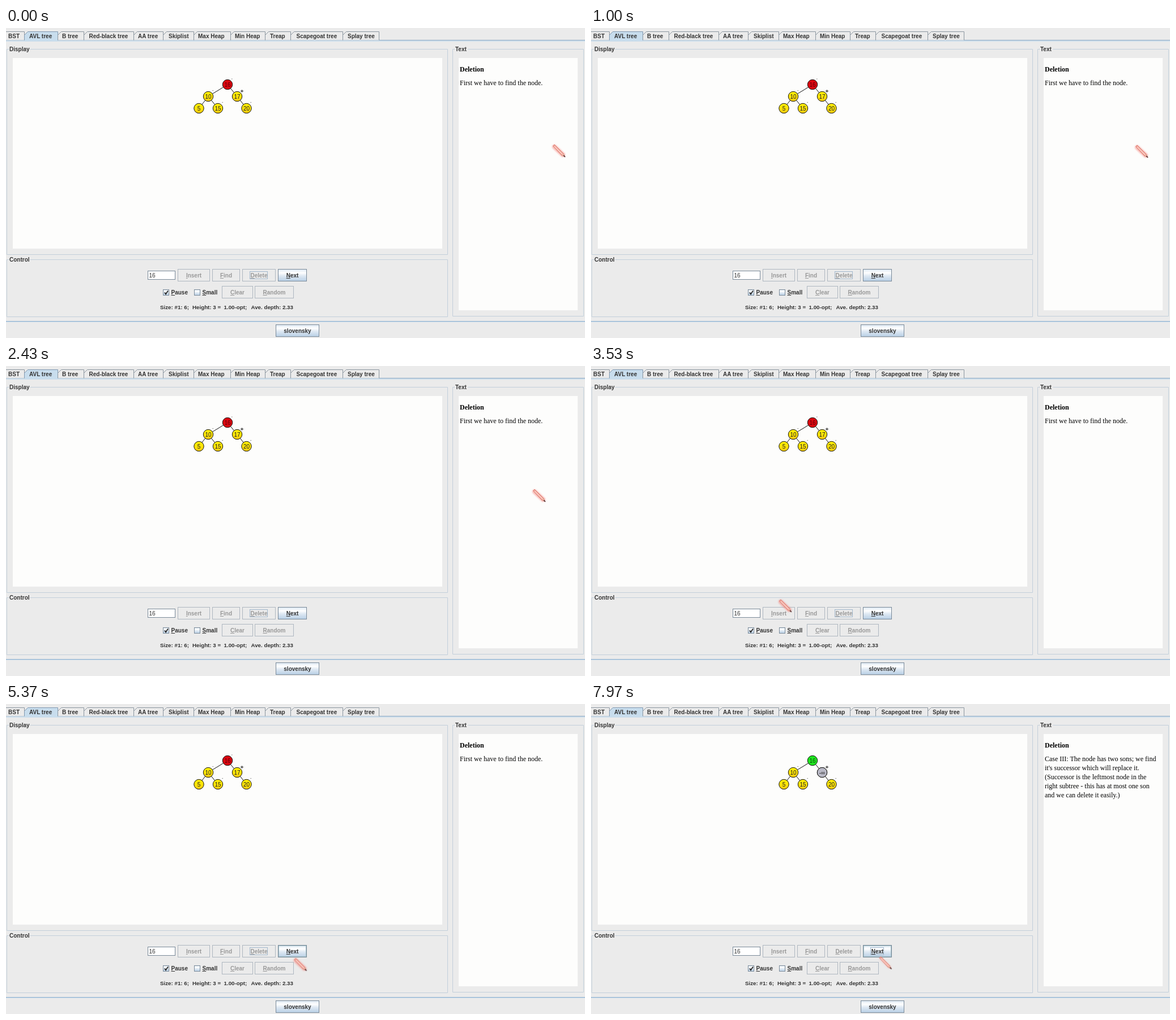
An HTML page that plays this animation: 1022 px wide and 548 px high, repeating every 8000 ms.

```html
<!DOCTYPE html>
<html lang="en">
<head>
<meta charset="utf-8">
<title>Tree visualisation</title>
<style>
html, body { margin: 0; width: 100%; height: 100%; overflow: hidden; background: #ebebeb; }
svg { display: block; width: 100vw; height: 100vh; }
text { font: bold 10px "Liberation Sans", Arial, sans-serif; fill: #333; white-space: pre; }
.plain { font-weight: normal; }
.off { fill: #999; }
.mid { text-anchor: middle; }
.key { text-decoration: underline; }
.status { font-size: 9.75px; }
.serif { font: 12px "Liberation Serif", "Times New Roman", serif; fill: #000; }
.serif.head { font-weight: bold; }
.num { font-weight: normal; }
.line { fill: none; stroke: #c2cfda; }
.edge { stroke: #111; }
.ring { fill: none; stroke: #a3b8cc; }

.before, .after, .hover, .visitor, .glow, .pen { animation: 8s linear infinite; }
.before { animation-name: before; }
.after { animation-name: after; }
.hover { animation-name: hover; }
.visitor { animation-name: visit; }
.glow { animation-name: fade; }
.pen { animation-name: pen; }
@keyframes before { 0%, 91.87% { opacity: 1 } 91.875%, 100% { opacity: 0 } }
@keyframes after { 0%, 91.87% { opacity: 0 } 91.875%, 100% { opacity: 1 } }
@keyframes hover { 0%, 65.49% { opacity: 0 } 65.5%, 100% { opacity: 1 } }
@keyframes fade { 0%, 67.2% { opacity: .5 } 74%, 100% { opacity: .08 } }
@keyframes visit {
  0%, 91.875% { transform: translate(391px, 38px) }
  98.125%, 100% { transform: translate(408px, 121px) }
}
@keyframes pen {
  0% { transform: translate(987px, 228px) }
  12.5% { transform: translate(983px, 229px) }
  30.375% { transform: translate(952px, 240px); animation-timing-function: ease-in-out }
  52.125%, 55.375% { transform: translate(120px, 511px); animation-timing-function: ease-in-out }
  65% { transform: translate(532px, 472px) }
  67.125% { transform: translate(530.5px, 471.5px) }
  70%, 100% { transform: translate(530.5px, 468.5px) }
}
</style>
</head>
<body>
<svg id="stage" viewBox="0 0 1022 548" preserveAspectRatio="none" xmlns="http://www.w3.org/2000/svg"></svg>
<script>
const text = (x, y, s, cls = "") => `<text x="${x}" y="${y}" class="${cls}">${s}</text>`;
const rect = (x, y, w, h, attrs) => `<rect x="${x}" y="${y}" width="${w}" height="${h}" ${attrs}/>`;
const group = (cls, ...parts) => `<g class="${cls}">${parts.join("")}</g>`;
const mnemonic = s => `<tspan class="key">${s[0]}</tspan>${s.slice(1)}`;

const defs = `<defs>
  <linearGradient id="metal" x2="0" y2="1">
    <stop stop-color="#dde8f3"/><stop offset=".3" stop-color="#fff"/>
    <stop offset=".55" stop-color="#dfe9f3"/><stop offset="1" stop-color="#b8cfe5"/>
  </linearGradient>
  <linearGradient id="gold" x2="0" y2="1">
    <stop stop-color="#fff000"/><stop offset=".5" stop-color="#fde408"/><stop offset="1" stop-color="#f4c810"/>
  </linearGradient>
  <filter id="soft" x="-50%" y="-50%" width="200%" height="200%"><feGaussianBlur stdDeviation="1.3"/></filter>
  <clipPath id="view"><rect x="12" y="53" width="758" height="337"/></clipPath>
</defs>`;

// Tabs: left edge, text start, label
const tabs = [[-8, 4, "BST"], [32.5, 41, "AVL tree"], [91.5, 99, "B tree"], [137.5, 146.5, "Red-black tree"],
  [225.5, 233, "AA tree"], [277.5, 287, "Skiplist"], [331.5, 339, "Max Heap"], [396.5, 404, "Min Heap"],
  [457.5, 466, "Treap"], [502.5, 512.5, "Scapegoat tree"], [594.5, 603, "Splay tree"], [658.5]];

const tab = ([x, tx, label], i) => {
  if (!label) return "";
  const right = tabs[i + 1][0], on = i === 1;
  return `<path d="M${x} 21.5V12.5L${x + 6} 6.5H${right}V21.5" fill="${on ? "#c8dded" : "#ebebeb"}"
    stroke="${on ? "#7f97b0" : "#8a959f"}"/>` + text(tx, 17.5, label);
};

const panel = (x, y, w, h, label, gap) =>
  `<path class="line" d="M${x + 4} ${y}H${x}V${y + h}H${x + w}V${y}H${x + 4 + gap}"/>` + text(x + 4.5, y + 3, label);

const button = (x, y, w, label, on) =>
  rect(x + .5, y + .5, w, 21, `fill="${on ? "url(#metal)" : "none"}" stroke="${on ? "#7a8a99" : "#aeb7c0"}"`) +
  text(x + w / 2 + .5, y + 15, label, on ? "mid" : "mid off");

const box = (x, label) => rect(x + .5, 462.5, 10, 10, 'fill="url(#metal)" stroke="#7a8a99"') +
  text(x + 14.5, 471, mnemonic(label));

const disc = (x, y, label, fill, ink = "#222") =>
  `<circle cx="${x}" cy="${y}" r="8.7" fill="${fill}" stroke="#111"/>` +
  `<text x="${x}" y="${y + 4}" class="num mid" style="fill:${ink}">${label}</text>`;

const edge = (x1, y1, x2, y2) => `<path class="edge" d="M${x1} ${y1}L${x2} ${y2}"/>`;
const dot = (x, y) => rect(x, y, 1.5, 1, 'fill="#777"');

const tree = [
  edge(391, 100, 357, 121), edge(391, 100, 408, 121), edge(357, 121, 340.5, 142),
  edge(357, 121, 374, 142), edge(408, 121, 424.5, 142),
  disc(357, 121, 10, "url(#gold)"), disc(408, 121, 17, "url(#gold)"),
  disc(340.5, 142, 5, "url(#gold)"), disc(374, 142, 15, "url(#gold)"), disc(424.5, 142, 20, "url(#gold)"),
  dot(364.5, 110), dot(381.5, 131), dot(431.5, 131),
  '<path d="M414 111.5h5M416.5 109v5" stroke="#222"/>',
  group("before", dot(398, 89.5), disc(391, 100, 16, "#dc0610", "#5c0008")),
  group("after", disc(391, 100, 16, "#1ee61e", "#0c4c0c")),
  group("after", group("visitor", disc(0, 0, "-∞", "#b9b9c6")))
].join("");

const story = ["Case III: The node has two sons; we find", "it's successor which will replace it.",
  "(Successor is the leftmost node in the", "right subtree - this has at most one son", "and we can delete it easily.)"];

// The pen's origin is its tip
const pen = `<g class="pen">
  <path class="glow" d="M-19 -18L-4 -4" stroke="#f58078" stroke-width="8" stroke-linecap="round" filter="url(#soft)"/>
  <path d="M-21.5 -19.5L-19 -22L-3 -6L-.5 -.5L-6 -3Z" fill="#f0a397" stroke="#d9776d" stroke-width=".9"/>
  <path d="M-19 -19L-5 -5" stroke="#fbd9d0" stroke-width="1.4"/>
  <path d="M-5.5 -3L-3 -5.5L-1.5 -2Z" fill="#e9c7ae"/>
  <path d="M-2.8 -2.8L0 0" stroke="#503030" stroke-width="1.7"/>
</g>`;

document.getElementById("stage").innerHTML = [
  defs,
  rect(0, 0, 1022, 548, 'fill="#ebebeb"'),
  rect(0, 21, 1022, 1, 'fill="#8fabc4"'), rect(0, 22, 1022, 2, 'fill="#cddeeb"'),
  tabs.map(tab).join(""),
  rect(33, 21, 58, 2, 'fill="#c8dded"'),
  panel(1.5, 37.5, 778, 363, "Display", 37),
  panel(1.5, 409.5, 778, 101, "Control", 37),
  panel(788.5, 37.5, 231, 472, "Text", 23),
  rect(12, 53, 758, 337, 'fill="#fdfdfc"'),
  rect(799, 53, 210, 446, 'fill="#fdfdfc"'),
  `<g clip-path="url(#view)">${tree}</g>`,
  text(801, 77, "Deletion", "serif head"),
  group("before", text(801, 101, "First we have to find the node.", "serif")),
  group("after", ...story.map((s, i) => text(801, 101 + 16 * i, s, "serif"))),
  rect(250.5, 429.5, 48, 15, 'fill="#fff" stroke="#7a8a99"'),
  text(252.5, 441, "16", "plain"),
  button(303, 426, 56, mnemonic("Insert")),
  button(364, 426, 48, mnemonic("Find")),
  button(417, 426, 58, mnemonic("Delete")),
  button(480, 426, 50, mnemonic("Next"), true),
  group("hover", rect(481.5, 427.5, 48, 19, 'fill="none" stroke="#a3c0c8"')),
  group("before", rect(430.5, 430.5, 31, 13, 'class="ring"')),
  group("after", rect(493.5, 430.5, 23, 13, 'class="ring"')),
  box(277, "Pause"), box(332, "Small"),
  '<path d="M280 467.5L282 470.5L286 464.5" fill="none" stroke="#222" stroke-width="1.8"/>',
  button(381, 456, 54, mnemonic("Clear")),
  button(439, 456, 68, mnemonic("Random")),
  text(272, 497, "Size: #1: 6;", "status"), text(329, 497, "Height: 3 =", "status"),
  text(384.5, 497, "1.00-opt;", "status"), text(432.5, 497, "Ave. depth: 2.33", "status"),
  rect(0, 518, 1022, 1, 'fill="#92b3d0"'), rect(0, 519, 1022, 1, 'fill="#c5d8ea"'),
  button(476, 524, 76, "slovensky", true),
  pen
].join("");
</script>
</body>
</html>
```
